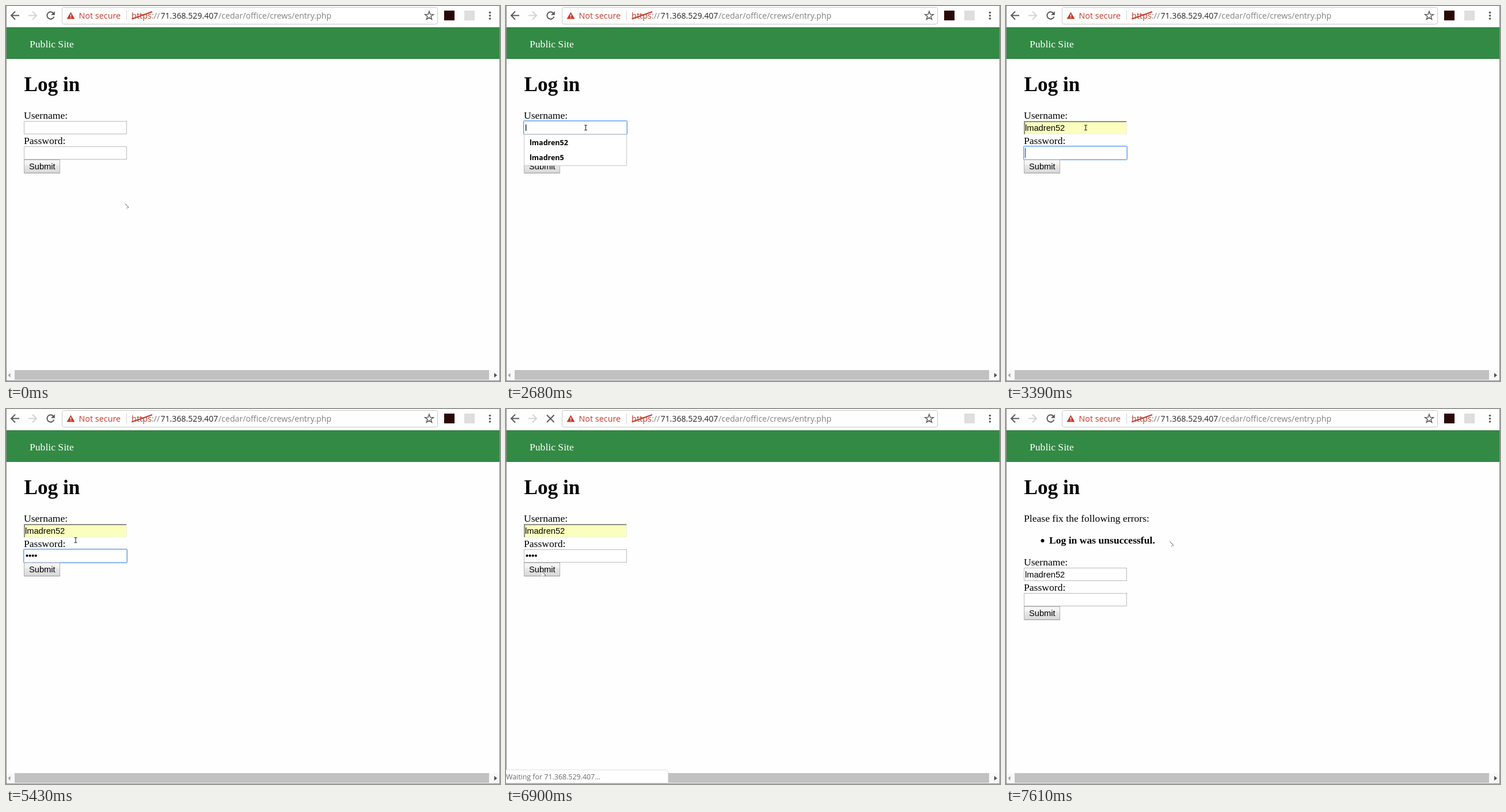
An HTML page that plays this animation: 858x652 px, repeating every 8 s.

```html
<!DOCTYPE html>
<html lang="en">
<head>
<meta charset="utf-8">
<title>Log in</title>
<style>
html, body { margin: 0; width: 100%; height: 100%; overflow: hidden; background: #fefefe; }
svg { display: block; }
text { white-space: pre; }
.ui { font: 14.3px "Open Sans", sans-serif; }
.serif { font: 17.6px "Liberation Serif", serif; }
.sans { font: 14.67px "Liberation Sans", sans-serif; }
.line { fill: none; stroke: #5a5a5a; stroke-width: 2; }
</style>
</head>
<body>
<svg width="858" height="652" viewBox="0 0 858 652">
  <defs>
    <linearGradient id="button" x2="0" y2="1">
      <stop offset="0" stop-color="#f8f8f8"/><stop offset=".38" stop-color="#f1f1f1"/>
      <stop offset=".4" stop-color="#e8e8e8"/><stop offset="1" stop-color="#d8d8d8"/>
    </linearGradient>
  </defs>
  <rect width="858" height="652" fill="#fefefe"/>

  <!-- toolbar -->
  <path class="line" d="M23 16.5H9.5M16 9.5L9 16.5L16 23.5"/>
  <path class="line" style="stroke:#d3d3d3" d="M39 16.5H52.5M46 9.5L53 16.5L46 23.5"/>
  <rect x="97.5" y="2.5" width="652" height="29" rx="3" fill="#fff" stroke="#c9c9c9"/>
  <path d="M112.5 10.5L119.5 22.5H105.5Z" fill="#c53929"/>
  <path d="M112.5 14.5V18.5M112.5 19.5V21" stroke="#fff" stroke-width="1.4"/>
  <path d="M209.5 8V25" stroke="#d5d5d5"/>
  <g class="ui">
    <text x="126.5" y="22" fill="#c53929" font-size="14.4">Not secure</text>
    <text x="218" y="22" fill="#c53929" style="font-size:14.5px">https</text>
    <text x="253" y="22" fill="#808080">://</text>
    <text x="268.5" y="22" fill="#222" style="font-size:14.1px">71.368.529.407</text>
    <text x="369" y="22" fill="#808080" style="font-size:14.2px">/cedar/office/crews/entry.php</text>
  </g>
  <path d="M218.5 22.5L254 10" stroke="#c53929" stroke-width="2"/>
  <path id="star" fill="none" stroke="#5a5a5a" stroke-width="1.5"/>
  <rect x="796" y="8" width="18" height="17" fill="#dedede"/>
  <g fill="#5a5a5a"><circle cx="840.5" cy="11.5" r="1.8"/><circle cx="840.5" cy="16.8" r="1.8"/><circle cx="840.5" cy="22" r="1.8"/></g>

  <!-- page frame -->
  <rect y="37" width="858" height="55" fill="#338a45"/>
  <path d="M0 37.5H858M0 91.5H858" stroke="#2f7b3f"/>
  <text class="serif" x="41" y="72" fill="#fff">Public Site</text>
  <text class="serif" x="31.5" y="148" style="font-size:35.2px;font-weight:bold">Log in</text>
  <rect x="1" y="633" width="856" height="17" fill="#f8f8f8"/>
  <rect x="15" y="633" width="824" height="17" fill="#c1c1c1"/>
  <path d="M7.5 638V646L3.5 642Z" fill="#a3a3a3"/>
  <path d="M848 638V646L853 642Z" fill="#505050"/>
  <path d="M.5 0V652M857.5 0V652M0 651.5H858" stroke="#8c8c8c"/>
  <g id="live"></g>
</svg>
<script>
const LOOP = 8000, NAME = 'lmadren52';
const live = document.getElementById('live');

const star = Array.from({ length: 10 }, (_, i) => {
  const r = i % 2 ? 3.2 : 7.8, a = i * Math.PI / 5 - Math.PI / 2;
  return `${(735 + r * Math.cos(a)).toFixed(1)} ${(17 + r * Math.sin(a)).toFixed(1)}`;
});
document.getElementById('star').setAttribute('d', `M${star.join('L')}Z`);

// Each step changes only the listed parts of the state.
const steps = [
  [0, { arrow: [206, 343], beam: null, focus: '', user: '', dots: 0, caret: false, list: false,
        pick: false, filled: false, button: '', loading: false, addon: true, status: false, failed: false }],
  [140, { arrow: null, beam: [167, 250] }],
  [360, { arrow: [138, 190], beam: null }],
  [500, { arrow: null, beam: [140.5, 207] }],
  [620, { beam: [138.5, 211.5] }],
  [900, { focus: 'user', caret: true }],
  [1460, { caret: false }],
  [1890, { caret: true }],
  [2170, { user: NAME[0], list: true }],
  [2680, { caret: false }],
  [2960, { user: NAME, pick: true, filled: true }],
  [3390, { list: false, pick: false, focus: 'pass', caret: true }],
  [3850, { caret: false }],
  [4410, { dots: 1, caret: true }],
  [4540, { dots: 2 }],
  [4690, { dots: 3 }],
  [4970, { dots: 4 }],
  [5430, { caret: false, beam: [121, 228] }],
  [5580, { beam: [102, 240] }],
  [5710, { beam: [79.5, 254] }],
  [5860, { beam: null, arrow: [66, 276], button: 'hover' }],
  [5980, { arrow: [62, 282] }],
  [6250, { focus: '', button: 'down' }],
  [6530, { button: '', loading: true }],
  [6900, { status: true, addon: false }],
  [7060, { failed: true, filled: false, dots: 0, loading: false, addon: true }],
  [7430, { status: false, arrow: [282, 229] }],
  [7610, { arrow: [284, 230] }]
];
const states = [];
steps.forEach(([, change], i) => states.push({ ...states[i - 1], ...change }));

const text = (cls, x, y, str, extra = '') => `<text class="${cls}" x="${x}" y="${y}" ${extra}>${str}</text>`;
const box = (x, y, w, h, fill, stroke, extra = '') =>
  `<rect x="${x}" y="${y}" width="${w}" height="${h}" fill="${fill}" stroke="${stroke}" ${extra}/>`;
const path = (d, stroke, extra = '') => `<path d="${d}" fill="none" stroke="${stroke}" ${extra}/>`;

function field(y, focused, filled) {
  let out = box(31.5, y + .5, 178, 22, filled ? '#faffbd' : '#fff', filled ? '#eee' : '#bbb');
  if (focused) {
    out += box(31.5, y + .5, 178, 22, 'none', '#bcd5fb') + box(30.5, y - .5, 180, 24, 'none', '#5b9bf3', 'rx="1"');
  } else if (filled) {
    out += path(`M32 ${y + 23}V${y + 1}H209`, '#8b8b83', 'stroke-width="2"');
  }
  return out;
}

function submit(y, mode) {
  const fill = { hover: '#e6e6e6', down: '#d2d2d2' }[mode] || 'url(#button)';
  const edge = mode ? '#8c8c8c' : '#b0b0b0';
  return box(31.5, y + .5, 62, 23, fill, edge) + path(`M32 ${y + 23.5}H94`, '#969696') +
    text('sans', 40, y + 17, 'Submit');
}

function form(s) {
  const y = s.failed ? 266 : 190;
  let out = text('serif', 31, y + 6, 'Username:') + text('serif', 31, y + 50, 'Password:') +
    field(y + 10, s.focus === 'user', s.filled) + field(y + 54, s.focus === 'pass') +
    submit(y + 77, s.button) + text('sans', 33, y + 26.5, s.user);
  for (let i = 0; i < s.dots; i++) out += `<circle cx="${36.5 + i * 5.1}" cy="${y + 65}" r="2.1"/>`;
  if (s.caret) {
    const inUser = s.focus === 'user';
    const x = inUser ? (s.user ? 36.5 : 33.5) : 33.5 + s.dots * 5.1;
    out += path(`M${x} ${inUser ? y + 13 : y + 57}v17`, '#333');
  }
  return out;
}

function suggestions(pick) {
  const bold = 'style="font-size:12.5px;font-weight:bold"';
  return box(31.5, 223.5, 178, 54, '#fff', '#c8c8c8') +
    (pick ? box(32, 224, 177, 27, '#e2e2e2', 'none') : '') +
    text('ui', 41, 241.5, NAME, bold) + text('ui', 41, 268, NAME.slice(0, -1), bold);
}

function errors() {
  return text('serif', 31, 196, 'Please fix the following errors:') +
    '<circle cx="63.5" cy="229" r="3"/>' +
    text('serif', 75, 234, 'Log in was unsuccessful.', 'font-weight="bold" style="font-weight:bold"');
}

function reload(loading) {
  if (loading) return path('M71 10.5L83.5 23M83.5 10.5L71 23', '#5a5a5a', 'stroke-width="2"');
  return path('M82 12.2A6.2 6.2 0 1 0 83.4 18.5', '#5a5a5a', 'stroke-width="2"') +
    '<path d="M84.8 9V15.8H78Z" fill="#5a5a5a"/>';
}

function pointer({ arrow, beam }) {
  if (beam) {
    return `<g transform="translate(${beam})">` +
      path('M-2.5 -4.3H2.5M0 -4.3V4.3M-2.5 4.3H2.5', '#222', 'stroke-width="1.1"') + '</g>';
  }
  return `<g transform="translate(${arrow})"><path d="M0 0V9L2 8L3.5 11L5.2 10.5L4.2 7.5H7Z" fill="#fff"/>` +
    path('M.5 .5L7 7', '#555') + path('M7 7.5H3.5M3 8.5L4.5 10.5', '#999') + '</g>';
}

function draw(s) {
  live.innerHTML = reload(s.loading) +
    (s.addon ? '<rect x="761" y="8" width="18" height="17" fill="#2a0808"/>' : '') +
    (s.failed ? errors() : '') + form(s) +
    (s.list ? suggestions(s.pick) : '') +
    (s.status ? '<path d="M0 627.5H278.5Q281.5 627.5 281.5 630.5V650H0" fill="#fff" stroke="#dedede"/>' +
      text('ui', 0, 644, 'Waiting for 71.368.529.407...', 'fill="#6a6a6a" style="font-size:12.4px"') : '') +
    pointer(s);
}

let shown = -1;
function tick() {
  const t = performance.now() % LOOP;
  const now = steps.findLastIndex(([start]) => start <= t);
  if (now !== shown) draw(states[shown = now]);
  requestAnimationFrame(tick);
}
tick();
</script>
</body>
</html>
```
